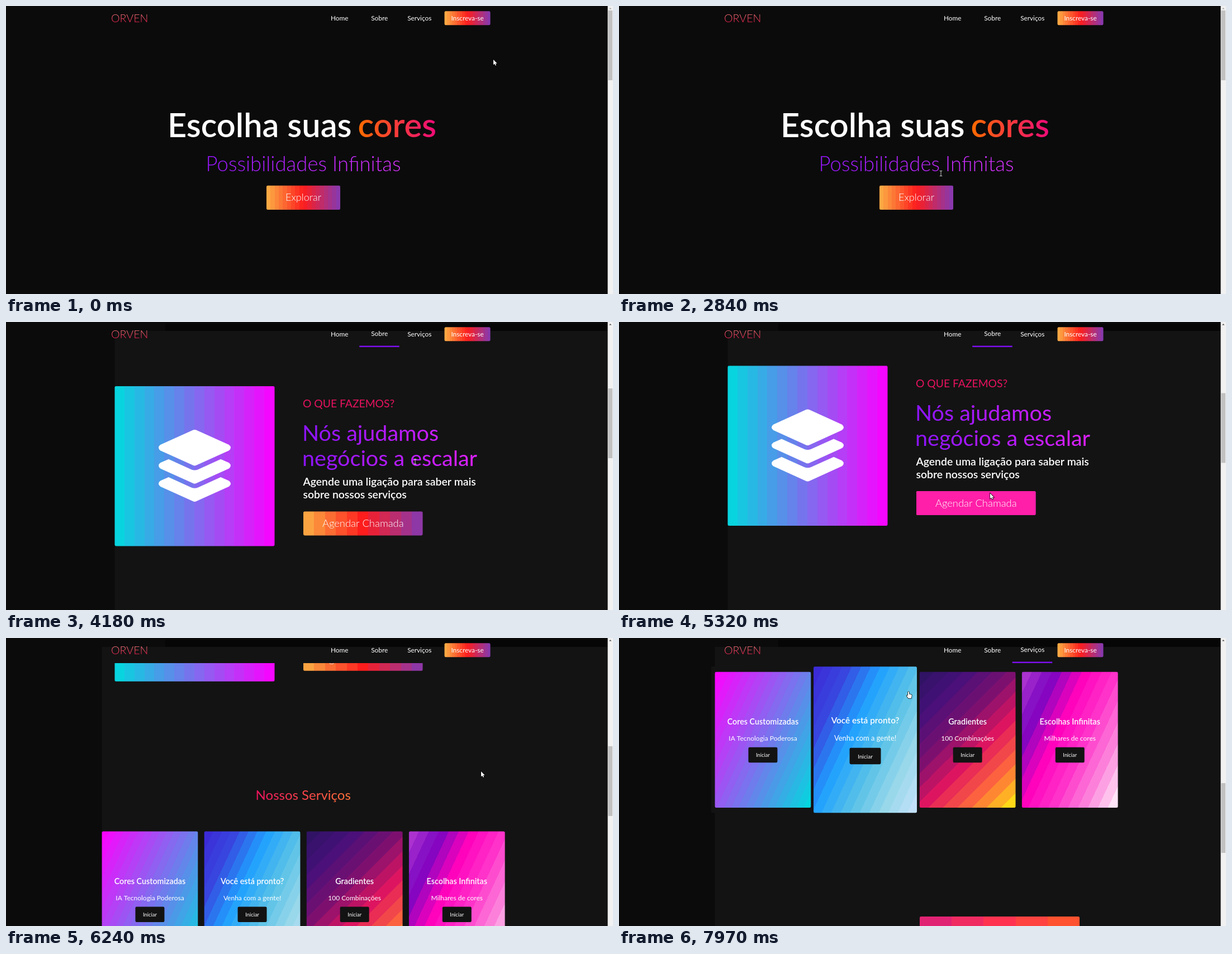
Recreate the animation shown at these times as an HTML page with a canvas. Size 1086x516 px, loop 8 s.

```html
<!DOCTYPE html>
<html lang="pt">
<head>
<meta charset="utf-8">
<style>
html, body { margin: 0; width: 100%; height: 100%; overflow: hidden; background: #0b0b0b; }
canvas { display: block; }
</style>
</head>
<body>
<canvas width="1086" height="516"></canvas>
<script>
const ctx = document.querySelector('canvas').getContext('2d');
const LOOP = 8000, VIEW = 516, NAV_H = 45;
const PINK = '#ff1fa8', PANEL = '#131313', DARK = '#0b0b0b', SUNSET = 'fcb045 fd1d1d 833ab4';

const clamp = v => Math.max(0, Math.min(1, v));
const ramp = (t, a, b) => clamp((t - a) / (b - a));
const smooth = u => u * u * (3 - 2 * u);
const easeOut = u => 1 - Math.pow(1 - u, 2.3);
const hover = (t, enter, leave, span) => ramp(t, enter, enter + span) - ramp(t, leave, leave + span);

const scrollAt = t => VIEW * easeOut(ramp(t, 3175, 4645)) + 573 * smooth(ramp(t, 5620, 6860));

// Pointer moves: start, end, destination and the look it keeps until the next move.
const moves = [
  [20, 140, 905, 94, 'arrow'],
  [690, 1490, 587, 20, 'arrow'],
  [1520, 2300, 828, 20, 'hand'],
  [2360, 2600, 842, 110, 'arrow'],
  [2600, 2840, 576, 300, 'beam'],
  [2870, 3140, 545, 340, 'hand'],
  [3170, 3930, 732, 250, 'beam'],
  [4300, 4810, 664, 307, 'hand'],
  [5320, 5750, 850, 239, 'arrow'],
  [6400, 6960, 286, 206, 'hand'],
  [7280, 7730, 459, 143, 'hand'],
  [7900, 7970, 518, 96, 'hand']
];

function pointerAt(t) {
  const p = { x: 872, y: 96, kind: 'arrow' };
  for (const [start, end, x, y, kind] of moves) {
    if (t < start) break;
    const u = smooth(ramp(t, start, end));
    p.x += (x - p.x) * u;
    p.y += (y - p.y) * u;
    p.kind = kind;
  }
  return p;
}

const cards = [
  { title: 'Cores Customizadas', note: 'IA Tecnologia Poderosa', angle: 115, steps: 22,
    colors: 'ff00ff 00dbde', enter: 6870, leave: 7430 },
  { title: 'Você está pronto?', note: 'Venha com a gente!', angle: 115, steps: 18,
    colors: '3b27d6 3846de 1fa0ff 55c0e8 97d8ea c9e2fb', enter: 7480, leave: LOOP },
  { title: 'Gradientes', note: '100 Combinações', angle: 135, steps: 16,
    colors: '2c1360 46107a 7a1070 e0155f ff6a3c ffee10', enter: LOOP, leave: LOOP },
  { title: 'Escolhas Infinitas', note: 'Milhares de cores', angle: 115, steps: 16,
    colors: 'b43ad2 7a06c0 ff00bc ff34ca fc88dc fff6fc', enter: LOOP, leave: LOOP }
];

function mix(colors, u) {
  const p = u * (colors.length - 1), i = Math.min(Math.floor(p), colors.length - 2), f = p - i;
  const channel = (hex, k) => parseInt(hex.slice(k, k + 2), 16);
  return `rgb(${[0, 2, 4].map(k =>
    Math.round(channel(colors[i], k) * (1 - f) + channel(colors[i + 1], k) * f))})`;
}

function bands(x0, y0, x1, y1, list, steps) {
  const g = ctx.createLinearGradient(x0, y0, x1, y1), colors = list.split(' ');
  for (let i = 0; i < steps; i++) {
    const c = mix(colors, (i + .5) / steps);
    g.addColorStop(i / steps, c);
    g.addColorStop((i + 1) / steps, c);
  }
  return g;
}

function fade(x0, y0, x1, y1, from, to) {
  const g = ctx.createLinearGradient(x0, y0, x1, y1);
  g.addColorStop(0, from);
  g.addColorStop(1, to);
  return g;
}

const fadeX = (x0, x1, from, to) => fade(x0, 0, x1, 0, from, to);

function rect(x, y, w, h, fill) {
  ctx.fillStyle = fill;
  ctx.fillRect(x, y, w, h);
}

function box(x, y, w, h, fill) {
  ctx.fillStyle = fill;
  ctx.beginPath();
  ctx.roundRect(x, y, w, h, 2.3);
  ctx.fill();
}

function text(str, x, y, size, fill = '#fff', weight = 400, align = 'left') {
  ctx.font = `${weight} ${size}px Lato, "Open Sans", sans-serif`;
  ctx.textAlign = align;
  ctx.fillStyle = fill;
  ctx.fillText(str, x, y);
}

function button(label, x, y, w, h, size, weight, steps, sweep = 0) {
  box(x, y, w, h, bands(x, 0, x + w, 0, SUNSET, steps));
  if (sweep > 0) box(x, y, w * sweep, h, PINK);
  text(label, x + w / 2, y + h / 2 + size * .34, size, '#fff', weight, 'center');
}

function hero(t) {
  text('Escolha suas', 289, 234.5, 59.5, '#fff', 600);
  text('cores', 629.5, 234.5, 59.5, fadeX(631, 771, '#ff6a00', '#ee0979'), 600);
  text('Possibilidades Infinitas', 532, 296, 36.5, fadeX(293, 771, '#8c10ff', '#e838ff'), 300, 'center');
  button('Explorar', 466, 321.7, 132, 43.3, 18, 300, 18, hover(t, 2900, 3210, 230));
}

const sheet = new Path2D('M12 148L245 254Q256 258 267 254L500 148Q524 128 500 108L267 2Q256 -2 245 2L12 108Q-12 128 12 148Z');
const fold = new Path2D('M500 236L441 210L280 283Q256 293 232 283L71 210L12 236Q-12 256 12 276L245 382Q256 386 267 382L500 276Q524 256 500 236Z');

function layersIcon(x, y, size) {
  ctx.save();
  ctx.translate(x, y);
  ctx.scale(size / 512, size / 512);
  ctx.fillStyle = '#fff';
  ctx.fill(sheet);
  ctx.fill(fold);
  ctx.translate(0, 128);
  ctx.fill(fold);
  ctx.restore();
}

function about(t) {
  box(194.5, 594.5, 286, 286.5, bands(194, 0, 480, 0, '00dbde fc00ff', 16));
  layersIcon(273, 672.5, 129);
  const violet = fadeX(532, 838, '#8c14fa', '#dd20ff');
  text('O QUE FAZEMOS?', 531, 633, 19.3, '#e8125f');
  text('Nós ajudamos', 530, 693, 39.5, violet);
  text('negócios a escalar', 530, 738, 39.5, violet);
  text('Agende uma ligação para saber mais', 531.5, 773, 19.4, '#fff', 600);
  text('sobre nossos serviços', 531.5, 796, 19.4, '#fff', 600);
  button('Agendar Chamada', 532, 819, 213.5, 43, 18.4, 300, 11, hover(t, 4690, 5420, 210));
}

function card(c, i, t) {
  const w = 171.7, h = 243.3, a = c.angle * Math.PI / 180;
  const dx = Math.sin(a), dy = -Math.cos(a), half = (w * dx + h * dy) / 2;
  const scale = 1 + .077 * smooth(hover(t, c.enter, c.leave, 240));
  ctx.save();
  ctx.translate(171.6 + i * 183.1 + w / 2, 1149.7 + h / 2);
  ctx.scale(scale, scale);
  box(-w / 2, -h / 2, w, h, bands(-dx * half, -dy * half, dx * half, dy * half, c.colors, c.steps));
  ctx.translate(0, -h / 2);
  text(c.title, 0, 94, 14.3, '#fff', 600, 'center');
  text(c.note, 0, 123, 12, '#fff', 400, 'center');
  box(-26, 135, 52, 27.5, PANEL);
  text('Iniciar', 0, 152.5, 9.4, '#fff', 400, 'center');
  ctx.restore();
}

function services(t) {
  text('Nossos Serviços', 531.7, 1093, 24, fadeX(448, 615, '#f0145e', '#ff7038'), 400, 'center');
  cards.forEach((c, i) => card(c, i, t));
  box(538, 1588, 286, 286, bands(538, 0, 824, 0, 'd91f7c ff3350 ff5a28', 5));
}

// The menu marks the section that the scroll position falls in.
function activeLink(y) {
  if (y > 806) return 2;
  if (y > 792 || y < 1) return -1;
  return y > 339 ? 1 : 0;
}

function nav(y, left) {
  if (y > 0) {
    rect(0, 0, 1076, NAV_H, DARK);
    rect(left, 16, 1076 - left, NAV_H - 16, PANEL);
    rect(285, 3, 791, 13, '#060606');
  }
  text('ORVEN', 188, 29, 19.7, fade(0, 10, 0, 32, '#ff8f88', '#f01048'), 300);
  ['Home', 'Sobre', 'Serviços'].forEach((label, i) => {
    const x = 596.7 + i * 71.5, on = i === activeLink(y);
    text(label, x, on ? 25 : 26, 11.8, '#fff', 400, 'center');
    if (on) rect(x - 36, 42.5, 71.5, 2.5, '#7d0ff0');
  });
  button('Inscreva-se', 784.5, 9.2, 82, 25, 11.8, 400, 18);
}

function scrollbar(y) {
  rect(1076.5, 0, 9.5, VIEW, '#f1f1f1');
  rect(1077.5, 8 + y * .2314, 7.5, 125, '#c1c1c1');
  ctx.fillStyle = y > 0 ? '#505050' : '#a3a3a3';
  ctx.fill(new Path2D('M1079 5.5L1081.2 3L1083.4 5.5Z'));
}

const shapes = {
  arrow: new Path2D('M0 0V9.4L2.2 7.4L3.7 10.8L5.2 10.1L3.7 6.9H6.7Z'),
  hand: new Path2D('M-1 .8Q0 -.6 1 .8V4.6L5 5.4Q6 5.8 5.8 7.5L4.8 12H-.2L-3.4 7.6Q-3.4 6.2 -2 6.8L-1 7.6Z'),
  beam: new Path2D('M-2.3 -4.5H2.3M0 -4.5V4.5M-2.3 4.5H2.3')
};

function pointer({ x, y, kind }) {
  ctx.save();
  ctx.translate(x, y);
  const beam = kind === 'beam';
  ctx.strokeStyle = beam ? '#c8c8c8' : '#000';
  ctx.lineWidth = beam ? 1 : 1.4;
  ctx.stroke(shapes[kind]);
  ctx.fillStyle = '#fff';
  if (!beam) ctx.fill(shapes[kind]);
  ctx.restore();
}

function draw(t) {
  const y = scrollAt(t), left = y < 634 ? 194.5 : 171.5, top = Math.max(0, VIEW - y);
  rect(0, 0, 1086, VIEW, DARK);
  rect(left, top, 1076 - left, VIEW - top, PANEL);
  if (t > 7110) rect(165, 51, 7, 262, PANEL);
  ctx.save();
  ctx.translate(0, -y);
  hero(t);
  about(t);
  services(t);
  ctx.restore();
  nav(y, left);
  scrollbar(y);
  pointer(pointerAt(t));
}

const start = performance.now();
function tick() {
  draw((performance.now() - start) % LOOP);
  requestAnimationFrame(tick);
}
tick();
</script>
</body>
</html>
```
